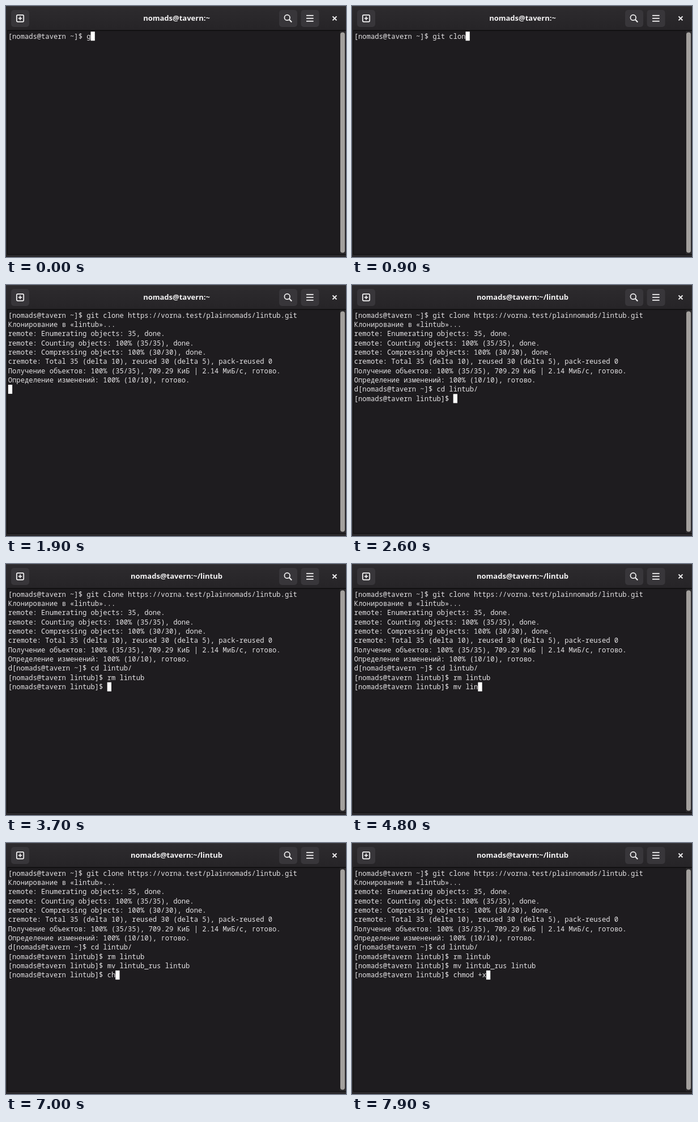
Write an HTML page with a canvas that moves like this. It is 600 px wide and 443 px high and loops after 8 s.

```html
<!DOCTYPE html>
<html lang="ru">
<head>
<meta charset="utf-8">
<title>Terminal</title>
<style>
  html, body { margin: 0; width: 100%; height: 100%; overflow: hidden; background: #1e1c1f; }
  canvas { display: block; width: 600px; height: 443px; }
</style>
</head>
<body>
<canvas id="stage"></canvas>
<script>
const W = 600, H = 443, LOOP = 8000;
const CELL = 7.285, ROW = 16.35, LEFT = 3.8, TOP = 45.2;
const MONO = '12.14px "Noto Sans Mono", "DejaVu Sans Mono", monospace';
const BOLD = '700 13px "Noto Sans", "Open Sans", sans-serif';

const canvas = document.getElementById('stage');
const ctx = canvas.getContext('2d');
const ratio = window.devicePixelRatio || 1;
canvas.width = W * ratio;
canvas.height = H * ratio;
ctx.scale(ratio, ratio);

const HOST = 'nomads@tavern';
const TOOL = 'lintub';
const HOME = `[${HOST} ~]$ `;
const INSIDE = `[${HOST} ${TOOL}]$ `;
const ENTERED = 2600;

// Everything the terminal prints, as [time, text] pairs
const output = [];
const print = (time, text) => output.push([time, text]);
const type = (time, text, gap = 100) =>
  [...text].forEach((ch, i) => print(time + i * gap, ch));

print(0, HOME + 'g');
type(300, 'it clone ');
print(1300, `https://vorna.test/plainnomads/${TOOL}.git`);
print(1400, `\nКлонирование в «${TOOL}»...\n`);
print(1700, 'remote: Enumerating objects: 35, done.\n' +
  'remote: Counting objects: 100% (35/35), done.\n' +
  'remote: Compressing objects: 100% (30/30), done.\n');
print(1800, 'c');
print(1900, 'remote: Total 35 (delta 10), reused 30 (delta 5), pack-reused 0\n' +
  'Получение объектов: 100% (35/35), 709.29 КиБ | 2.14 МиБ/с, готово.\n' +
  'Определение изменений: 100% (10/10), готово.\n');
print(2000, 'd');
print(2100, HOME + 'cd');
print(2300, ' ');
print(2400, TOOL.slice(0, 2));
print(2500, TOOL.slice(2) + '/');
print(ENTERED, '\n' + INSIDE);
type(2800, 'rm ' + TOOL);
print(3700, '\n' + INSIDE);
print(4300, 'm');
print(4500, 'v ');
type(4600, TOOL.slice(0, 4));
print(5000, TOOL.slice(4));
print(5200, '_');
print(5300, 'rus ');
type(5500, TOOL);
print(6200, '\n' + INSIDE);
type(6700, 'ch', 200);
type(7300, 'mod ');
type(7800, '+x');

function box(x, y, w, h, r, fill) {
  ctx.beginPath();
  ctx.roundRect(x, y, w, h, r);
  ctx.fillStyle = fill;
  ctx.fill();
}

function line(x1, y1, x2, y2) {
  ctx.beginPath();
  ctx.moveTo(x1, y1);
  ctx.lineTo(x2, y2);
  ctx.stroke();
}

function drawIcons() {
  for (const x of [9, 482, 520.5]) box(x, 7, 32, 30, 5, '#38363a');
  ctx.strokeStyle = '#f4f3f4';
  ctx.lineWidth = 1.7;

  // New tab
  ctx.beginPath();
  ctx.roundRect(18.8, 15.8, 12.4, 12, 2);
  ctx.stroke();
  line(21.8, 21.8, 28.2, 21.8);
  line(25, 18.6, 25, 25);

  // Search
  ctx.beginPath();
  ctx.arc(496.2, 20.4, 4.8, 0, Math.PI * 2);
  ctx.stroke();
  ctx.lineWidth = 2.1;
  line(499.8, 24, 504.2, 28.4);

  // Menu
  ctx.lineWidth = 1.8;
  for (const y of [16.8, 21.8, 26.8]) line(530, y, 542.6, y);

  // Close
  ctx.lineWidth = 2;
  line(576.4, 18.4, 583.4, 25.4);
  line(583.4, 18.4, 576.4, 25.4);
}

function drawWindow(title) {
  ctx.fillStyle = '#29272a';
  ctx.fillRect(0, 0, W, H);
  const shade = ctx.createLinearGradient(0, 0, 0, 43);
  shade.addColorStop(0, '#2d2b2e');
  shade.addColorStop(1, '#262427');
  ctx.fillStyle = shade;
  ctx.fillRect(0, 0, W, 43);
  ctx.fillStyle = '#3a383b';
  ctx.fillRect(0, 0, W, 1);

  ctx.fillStyle = '#0d0c0d';
  ctx.fillRect(2, 42.5, W - 2, 396.5);
  ctx.fillStyle = '#1e1c1f';
  ctx.fillRect(3, 44, 585, 394);
  ctx.fillStyle = '#2a282b';
  ctx.fillRect(588.5, 44, 11.5, 394);
  box(590, 46.5, 8, 389, 4, '#a3a09d');

  drawIcons();
  ctx.font = BOLD;
  ctx.textAlign = 'center';
  ctx.textBaseline = 'alphabetic';
  ctx.fillStyle = '#f4f3f4';
  ctx.fillText(title, 301, 26.2);
}

function drawTerminal(time) {
  const lines = output.filter(([at]) => at <= time).map(([, text]) => text).join('').split('\n');
  ctx.font = MONO;
  ctx.textAlign = 'left';
  ctx.fillStyle = '#e6e4e6';
  lines.forEach((text, row) => {
    [...text].forEach((ch, col) => {
      ctx.fillText(ch, LEFT + col * CELL, TOP + row * ROW + 12.4);
    });
  });
  const last = lines.length - 1;
  ctx.fillStyle = '#ffffff';
  ctx.fillRect(LEFT + lines[last].length * CELL, TOP + last * ROW, CELL, ROW - 0.3);
}

function draw(now) {
  const time = now % LOOP;
  drawWindow(`${HOST}:~${time >= ENTERED ? '/' + TOOL : ''}`);
  drawTerminal(time);
}

const start = performance.now();
function frame() {
  draw(performance.now() - start);
  requestAnimationFrame(frame);
}
frame();
</script>
</body>
</html>
```
